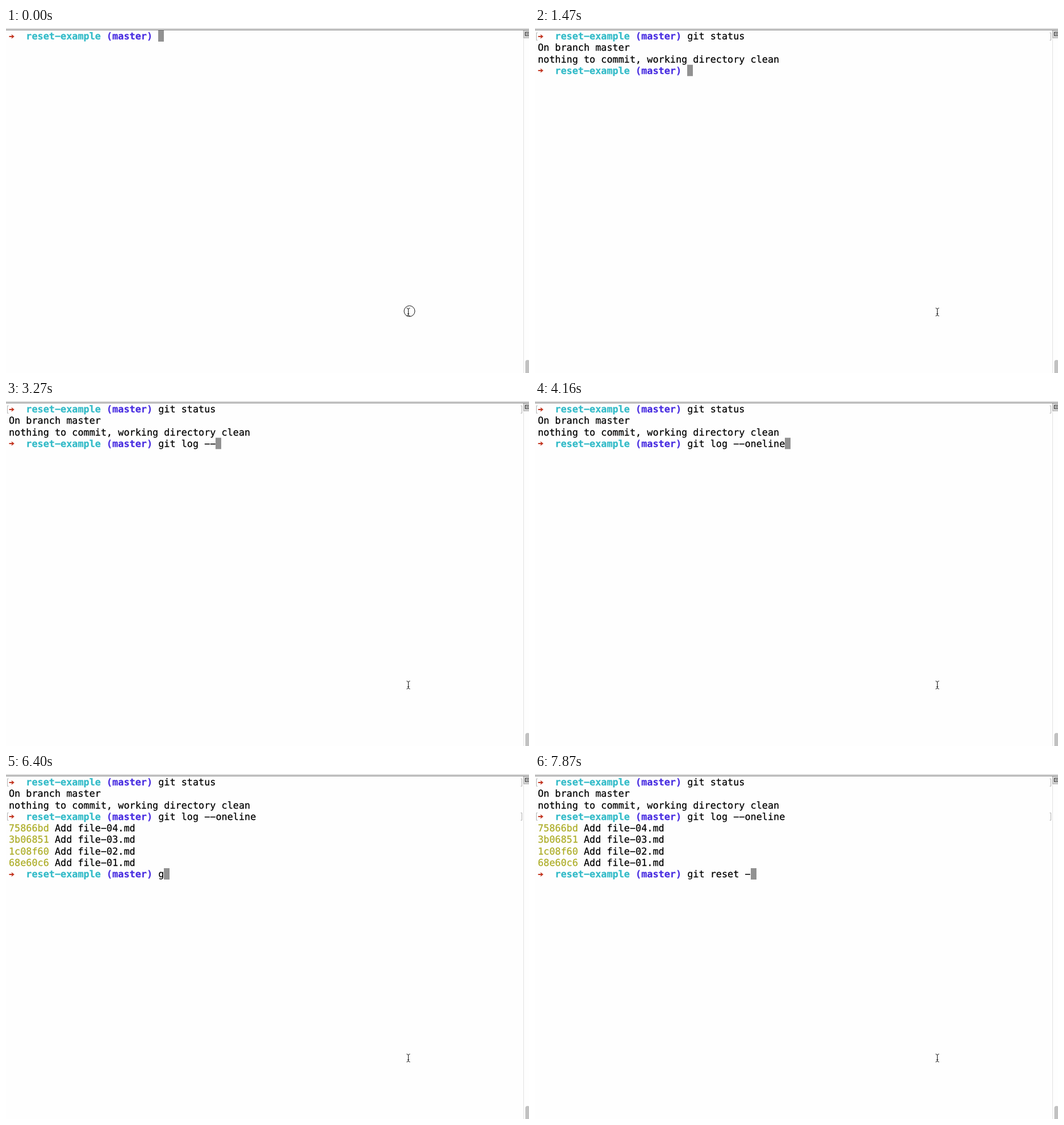
An HTML page with a canvas for the animation above (8 s loop, 921 by 608 pixels).

```html
<!DOCTYPE html>
<html lang="en">
<head>
<meta charset="utf-8">
<title>Terminal session</title>
<style>
  html, body { margin: 0; width: 100%; height: 100%; overflow: hidden; background: #fefefe; }
  canvas { display: block; }
</style>
</head>
<body>
<canvas id="stage" width="921" height="608"></canvas>
<script>
const ctx = document.getElementById('stage').getContext('2d');
ctx.textRendering = 'geometricPrecision';

const LOOP = 8000, TICK = 148;
const LEFT = 4.9, TOP = 4, CELL = 10.125, ROW = 2 * CELL;
const BLACK = '#000', RED = '#c23621', CYAN = '#33bbc8', BLUE = '#492ee1', OLIVE = '#adad27';
const PROMPT_COLS = 26;

// Each "|" in a command is one tick of typing time; the output replaces the cursor at "enter".
const session = [
  { typing: 'g|i|t| |s|t|at|u|s', start: 148, enter: 1470,
    output: [['', 'On branch master'], ['', 'nothing to commit, working directory clean']] },
  { typing: 'gi||t |l||og| ||--||on|el||in|e', start: 2075, enter: 5210,
    output: [['75866bd', ' Add file-04.md'], ['3b06851', ' Add file-03.md'],
             ['1c08f60', ' Add file-02.md'], ['68e60c6', ' Add file-01.md']] },
  { typing: 'g|it| |r|e|s|e||t| |-', start: 6390, enter: Infinity, output: [] }
];

function rect(x, y, w, h, color) {
  ctx.fillStyle = color;
  ctx.fillRect(x, y, w, h);
}

function stroke(path, color, width = 1) {
  ctx.strokeStyle = color;
  ctx.lineWidth = width;
  ctx.stroke(new Path2D(path));
}

// Characters sit on a fixed terminal grid; the minus sign gives the wide dash.
function write(text, col, row, color, weight = 'normal') {
  ctx.font = `${weight} 16.8px "DejaVu Sans Mono", monospace`;
  ctx.fillStyle = ctx.strokeStyle = color;
  ctx.lineWidth = 0.25;
  [...text.replace(/-/g, '\u2212')].forEach((char, i) => {
    const x = LEFT + (col + i) * CELL, y = TOP + 16 + row * ROW;
    ctx.fillText(char, x, y);
    ctx.strokeText(char, x, y);
  });
}

function drawPrompt(row) {
  const y = Math.round(TOP + 10.5 + row * ROW);
  stroke(`M5.5 ${y}H11`, RED, 2);
  ctx.fillStyle = RED;
  ctx.fill(new Path2D(`M9.5 ${y - 4}L14.8 ${y}L9.5 ${y + 4}L10.6 ${y}Z`));
  write('reset-example', 3, row, CYAN, 'bold');
  write('(master)', 17, row, BLUE, 'bold');
}

function drawMarks(row) {
  const top = Math.round(TOP + 3.5 + row * ROW) + 0.5;
  stroke(`M4.5 ${top}H2.5v13H4.5M906.5 ${top}H908.5v13H906.5`, '#b0b0b0');
}

function typedText(typing, elapsed) {
  const ticks = Math.max(0, Math.floor(elapsed / TICK) + 1);
  return typing.split('|').slice(0, ticks).join('');
}

function drawSession(time) {
  let row = 0;
  for (const { typing, start, enter, output } of session) {
    const text = typedText(typing, time - start);
    drawPrompt(row);
    if (time < enter) {
      rect(Math.round(LEFT + (PROMPT_COLS + text.length) * CELL), TOP + row * ROW, 10, 20, '#919191');
    } else {
      drawMarks(row);
    }
    write(text, PROMPT_COLS, row++, BLACK);
    if (time < enter) return;
    for (const [hash, message] of output) {
      write(hash, 0, row, OLIVE);
      write(message, hash.length, row++, BLACK);
    }
  }
}

function drawWindow() {
  rect(0, 0, 921, 608, '#fefefe');
  rect(911, 4, 1, 604, '#e2e2e2');
  rect(911, 4, 10, 13, '#d6d6d6');
  stroke('M911.5 4V17.5H921', '#a8a8a8');
  stroke('M921 7.5H914.5V13.5H921M916 10.5H921', '#222');
  rect(0, 0, 921, 3, '#dcdcdc');
  rect(0, 3, 921, 1, '#777');
  ctx.fillStyle = '#c1c1c1';
  ctx.beginPath();
  ctx.roundRect(914.5, 585, 8, 30, 4);
  ctx.fill();
}

function drawPointer(time) {
  stroke('M705.5 493.5Q708.5 493.5 708.5 496.5V504.5Q708.5 507.5 705.5 507.5' +
         'M711.5 493.5Q708.5 493.5 708.5 496.5M708.5 504.5Q708.5 507.5 711.5 507.5M707 503.5H710', '#111');
  if (time < TICK) stroke('M701 499a9.5 9.5 0 1 0 19 0a9.5 9.5 0 1 0 -19 0', '#111');
}

function frame() {
  const time = performance.now() % LOOP;
  drawWindow();
  drawSession(time);
  drawPointer(time);
  requestAnimationFrame(frame);
}
frame();
</script>
</body>
</html>
```
